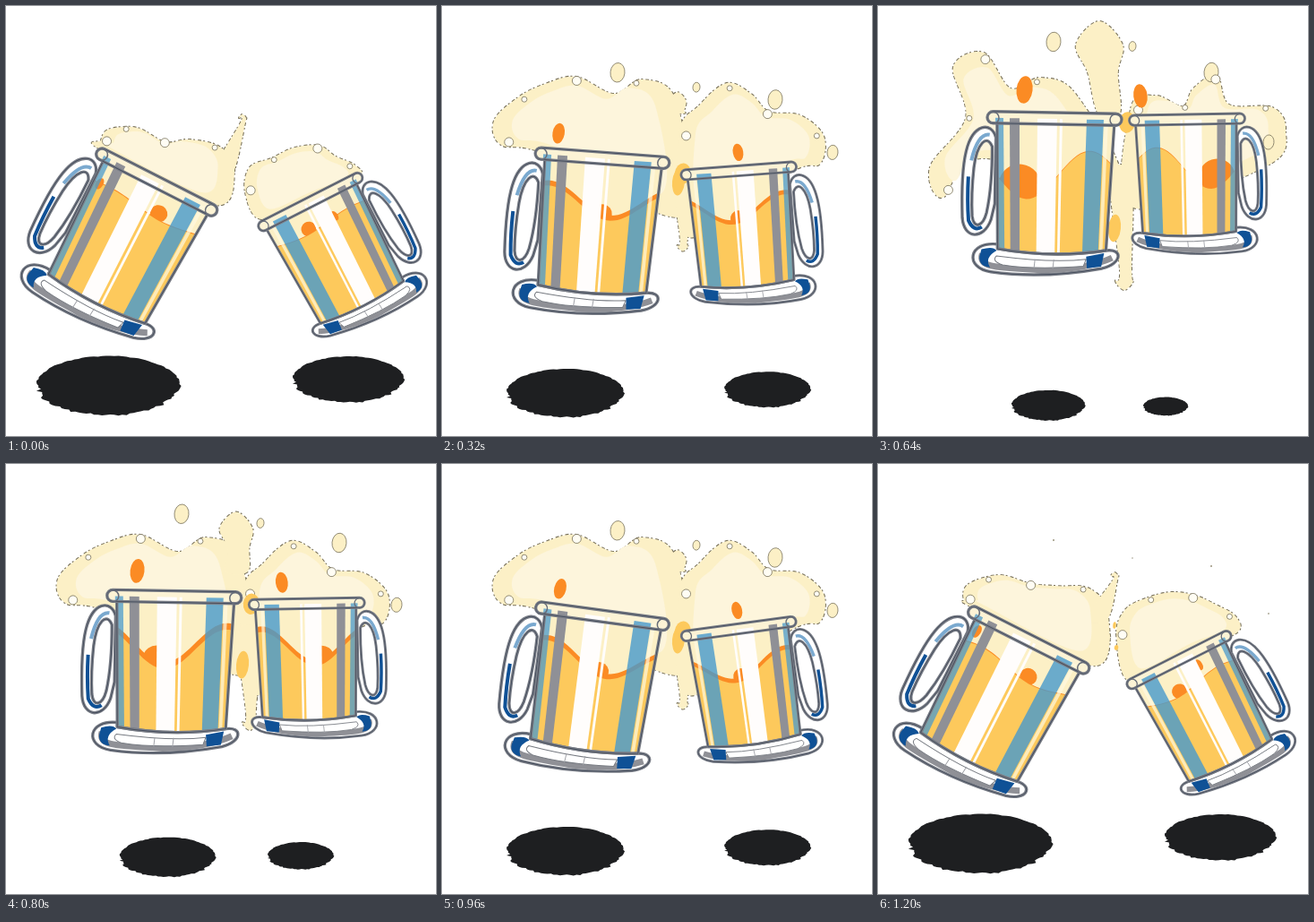
An HTML page with a canvas that plays this animation: 480 by 480 pixels, repeating every 1.28 s.

```html
<!DOCTYPE html>
<html lang="en">
<head>
<meta charset="utf-8">
<title>Cheers</title>
<style>
html, body { margin: 0; width: 100%; height: 100%; overflow: hidden; background: #fff; }
canvas { display: block; width: 100vmin; height: 100vmin; }
</style>
</head>
<body>
<canvas id="stage" width="480" height="480"></canvas>
<script>
const ctx = document.getElementById('stage').getContext('2d');
const STEP = 80, STEPS = 16;
const CREAM = '#fcf0c6', PALE = '#fdf5dc', BEER = '#fdc95c', ORANGE = '#fb8b24';
const NAVY = '#0f5196', GRAY = '#8f9096', EDGE = '#77705a';

const mix = (a, b, t) => a + (b - a) * t;
const ramp = (v, a, b) => Math.min(1, Math.max(0, (v - a) / (b - a)));
const ease = (v, a, b) => { const t = ramp(v, a, b); return t * t * (3 - 2 * t); };

// Foam outlines at rest, swelling as a cloud, and at the moment of the clink
const foams = [{
  rest: [105,160, 106,150, 112,139, 130,135, 150,137, 178,152, 205,149, 240,158, 255,186, 232,222],
  cloud: [115,165, 66,155, 58,128, 85,102, 115,87, 150,79, 192,98, 224,82, 262,108, 268,235],
  burst: [115,170, 72,214, 58,180, 98,125, 84,68, 118,52, 148,92, 182,80, 222,100, 268,200]
}, {
  rest: [285,238, 267,208, 272,180, 296,170, 322,158, 350,156, 368,168, 390,178, 394,192, 340,215],
  cloud: [275,258, 264,145, 288,110, 318,86, 345,98, 365,118, 400,122, 426,145, 422,176, 390,185],
  burst: [285,225, 282,115, 310,100, 340,112, 352,92, 378,77, 392,110, 440,113, 455,138, 435,178]
}];

// Top position, radius and rise of each flying drop
const drops = [[196, 40, 8, 45], [372, 74, 8, 40], [436, 152, 6, 15], [284, 45, 4, 60]];

// Everything that moves follows from these few amounts
function pose(step) {
  const up = 1 - Math.abs(step - 8) / 8;
  return {
    up,
    lift: ramp(up, .15, 1) ** 1.1,
    swell: ramp(up, 0, .5),
    spray: ramp(up, .4, 1) ** .8,
    burst: ramp(up, .75, 1),
    tilt: step < 8
      ? 27 - 35 * ramp(up, 0, .77) + 9 * ease(up, .77, 1)
      : 1 + 26 * ease(1 - up, .3, .9)
  };
}

// Smooth closed curve through a flat list of points
function curve(flat) {
  const n = flat.length / 2, path = new Path2D();
  const p = (i, k) => flat[(i + n) % n * 2 + k];
  path.moveTo(flat[0], flat[1]);
  for (let i = 0; i < n; i++) {
    const a = k => p(i, k) + (p(i + 1, k) - p(i - 1, k)) / 6;
    const b = k => p(i + 1, k) - (p(i + 2, k) - p(i, k)) / 6;
    path.bezierCurveTo(a(0), a(1), b(0), b(1), p(i + 1, 0), p(i + 1, 1));
  }
  path.closePath();
  return path;
}

// Round-headed column of foam growing from a base
function spout(x, y, r, bx, by, dir) {
  return curve([bx - 12, by, x - r * .5, y + dir * r * 1.2, x - r, y, x, y - dir * r,
    x + r, y, x + r * .8, y + dir * r * 1.2, bx + 12, by]);
}

function fill(path, color, rule = 'nonzero') {
  ctx.fillStyle = color;
  ctx.fill(path, rule);
}

function stroke(path, color, width) {
  ctx.strokeStyle = color;
  ctx.lineWidth = width;
  ctx.stroke(path);
}

function oval(x, y, r, stretch, color, line) {
  const path = new Path2D();
  path.ellipse(x, y, r, r * stretch, .1, 0, 7);
  fill(path, color);
  if (line) stroke(path, line, .8);
}

function shadow(x, y, rx) {
  ctx.beginPath();
  for (let i = 0; i < 110; i++) {
    const a = i / 110 * Math.PI * 2;
    const noise = Math.abs(Math.sin(i * 78.23) * 4375.85) % 1;
    const r = rx * (1.02 - noise * (Math.sin(a) > 0 ? .08 : .03));
    ctx.lineTo(x + r * Math.cos(a), y + r * .415 * Math.sin(a));
  }
  ctx.fillStyle = '#1e1f21';
  ctx.fill();
}

const outlineOf = (f, m) =>
  f.rest.map((v, i) => mix(mix(v, f.cloud[i], m.swell), f.burst[i], m.burst));

// Moves a closed outline towards its own centre
function shrink(flat, size) {
  const n = flat.length / 2, mid = [0, 0];
  flat.forEach((v, i) => mid[i % 2] += v / n);
  return flat.map((v, i) => mix(mid[i % 2], v, size));
}

function foam(m) {
  const { spray, swell, up } = m;
  const shapes = foams.map(f => outlineOf(f, m));
  const parts = [
    ...shapes.map(curve),
    spout(264 - 17 * spray ** 2, 125 - 82 * spray, 4 + 22 * spray, mix(240, 258, swell), mix(190, 120, swell), 1),
    spout(245 + 22 * swell + 8 * spray, 200 + 55 * swell + 52 * spray, 5 + 5 * spray, mix(238, 271, swell), 190, -1)
  ];
  ctx.setLineDash([4, 2, 2, 3]);
  parts.forEach(p => stroke(p, EDGE, 2));
  ctx.setLineDash([]);
  parts.forEach(p => fill(p, CREAM));
  shapes.forEach(s => fill(curve(shrink(s, .78)), PALE));

  const size = ramp(up, .1, .5);
  drops.forEach(([x, y, r, rise]) => oval(x, y + rise * (1 - spray), r * size, 1.35, CREAM, EDGE));
  shapes.forEach(s => {
    const inner = shrink(s, .9);
    for (let i = 1; i < 9; i += 2) oval(inner[i * 2], inner[i * 2 + 1], 2 + i * 3 % 4, 1, '#fffdf4', EDGE);
  });
  oval(266 + 12 * spray, 205 - 75 * spray, 9 * swell, 1.3, BEER);
  oval(264, 180 + 68 * spray, 7 * swell, 2.2, BEER);
}

const body = new Path2D('M-64 3 L67 3 L60 146 Q0 156 -61 146 Z');
const base = new Path2D('M-61 141 C-94 138 -98 168 -68 172 Q-10 179 56 166 C79 160 79 143 60 146 Q0 156 -61 146 Z');
const baseShade = new Path2D('M-78 152 C-83 168 -60 167 -10 169 Q40 167 67 154');
const baseWell = new Path2D('M-62 154 Q0 161 38 156 L35 164 Q-20 169 -55 164 Q-68 160 -62 154 Z');
const baseBlue = new Path2D('M-79 147 Q-66 143 -62 148 Q-76 156 -69 167 Q-82 166 -81 155 Z M38 153 L58 149 L55 164 L39 166 Z');
const baseLines = new Path2D('M-19 157 L-20 167 M2 157 L1 167');
const rim = new Path2D();
rim.roundRect(-75, -7, 150, 13, 6.5);
const rimEnds = new Path2D('M-62 0 A6.5 6.5 0 1 1 -75 0 A6.5 6.5 0 1 1 -62 0 M75 0 A6.5 6.5 0 1 1 62 0 A6.5 6.5 0 1 1 75 0');
const handle = new Path2D('M-65 22 C-70 4 -91 6 -98 38 C-103 60 -102 90 -101 112 C-99 136 -77 137 -69 114 L-65 96 Z M-69 32 C-75 18 -86 28 -89 56 C-91 78 -91 96 -90 110 C-88 125 -78 122 -74 106 Q-68 76 -69 32 Z');
const handleTint = new Path2D('M-72 19 Q-85 17 -92 48');
const handleBlue = new Path2D('M-95 66 Q-96 92 -94 115 Q-88 128 -79 122');

function band(x, width, color) {
  ctx.fillStyle = color;
  ctx.beginPath();
  ctx.moveTo(x, 0);
  ctx.lineTo(x + width, 0);
  ctx.lineTo((x + width) * .93, 156);
  ctx.lineTo(x * .93, 156);
  ctx.fill();
}

function clipped(path, draw) {
  ctx.save();
  ctx.clip(path);
  draw();
  ctx.restore();
}

function liquid({ swell, spray }) {
  const level = 33 + 15 * swell + 15 * spray, height = 4 + 10 * swell + 13 * spray;
  const phase = .4 + 2.5 * spray, dip = (Math.PI / 2 - phase) / .045;
  const wave = (color, rise) => {
    ctx.beginPath();
    ctx.moveTo(-70, 170);
    for (let x = -70; x <= 70; x += 4) ctx.lineTo(x, level - rise + height * Math.sin(x * .045 + phase));
    ctx.lineTo(70, 170);
    ctx.fillStyle = color;
    ctx.fill();
  };
  const r = 9 + 12 * spray ** 2;
  wave(ORANGE, 1 + 7 * Math.sin(Math.PI * spray));
  oval(dip - 8, level + height - r * .8, r * 1.1, .95, ORANGE);
  wave(BEER, 0);
}

function stripes() {
  band(-66, 9, 'rgba(75,155,205,.75)');
  band(-50, 11, GRAY);
  band(-19, 22, '#fffdfc');
  band(6, 3, '#fffdfc');
  band(36, 19, 'rgba(72,154,206,.8)');
  band(56, 4, 'rgba(255,250,225,.7)');
}

function outline(path) {
  stroke(path, '#7b7f88', 3.4);
  stroke(path, '#48505f', 1);
}

function mug(x, y, flip, size, hop, m) {
  const { swell, spray, tilt } = m;
  ctx.save();
  ctx.translate(x, y);
  ctx.scale(flip * size, size);
  ctx.rotate(tilt * Math.PI / 180);

  clipped(body, () => {
    fill(body, CREAM);
    liquid(m);
  });
  oval(mix(...hop, spray), 30 - 52 * swell - 10 * spray, 4 + 2 * swell + 3 * spray, 1.7, ORANGE);
  clipped(body, stripes);

  fill(handle, '#fff', 'evenodd');
  stroke(handleTint, '#7aa9cf', 4);
  stroke(handleBlue, NAVY, 4);
  outline(handle);

  fill(base, '#fff');
  stroke(baseShade, GRAY, 7);
  fill(baseWell, '#fff');
  stroke(baseWell, '#777b82', 1);
  fill(baseBlue, NAVY);
  stroke(baseLines, '#a0a2a8', 1);
  outline(base);
  outline(body);

  fill(rim, '#fcf3d5');
  clipped(rim, stripes);
  outline(rim);
  stroke(rimEnds, '#666c78', 1.5);
  ctx.restore();
}

function draw(now) {
  const m = pose(Math.floor(now / STEP) % STEPS), { up, lift } = m;
  const drift = ease(lift, .1, .85);
  ctx.fillStyle = '#fff';
  ctx.fillRect(0, 0, 480, 480);
  ctx.lineJoin = 'round';
  shadow(114 + 76 * drift, 424 + 22 * lift, 80 - 39 * lift);
  shadow(382 - 61 * drift, 417 + 30 * lift, 62 - 37 * lift);
  foam(m);
  mug(340 - 10 * Math.sin(Math.PI * up) + 5 * up * up, 219 - 92 * lift, -1, .86, [-20, 60], m);
  mug(168 + 29 * lift, 197 - 71 * lift, 1, 1, [-56, -34], m);
}

const start = performance.now();
function loop() {
  draw(performance.now() - start);
  requestAnimationFrame(loop);
}
loop();
</script>
</body>
</html>
```
